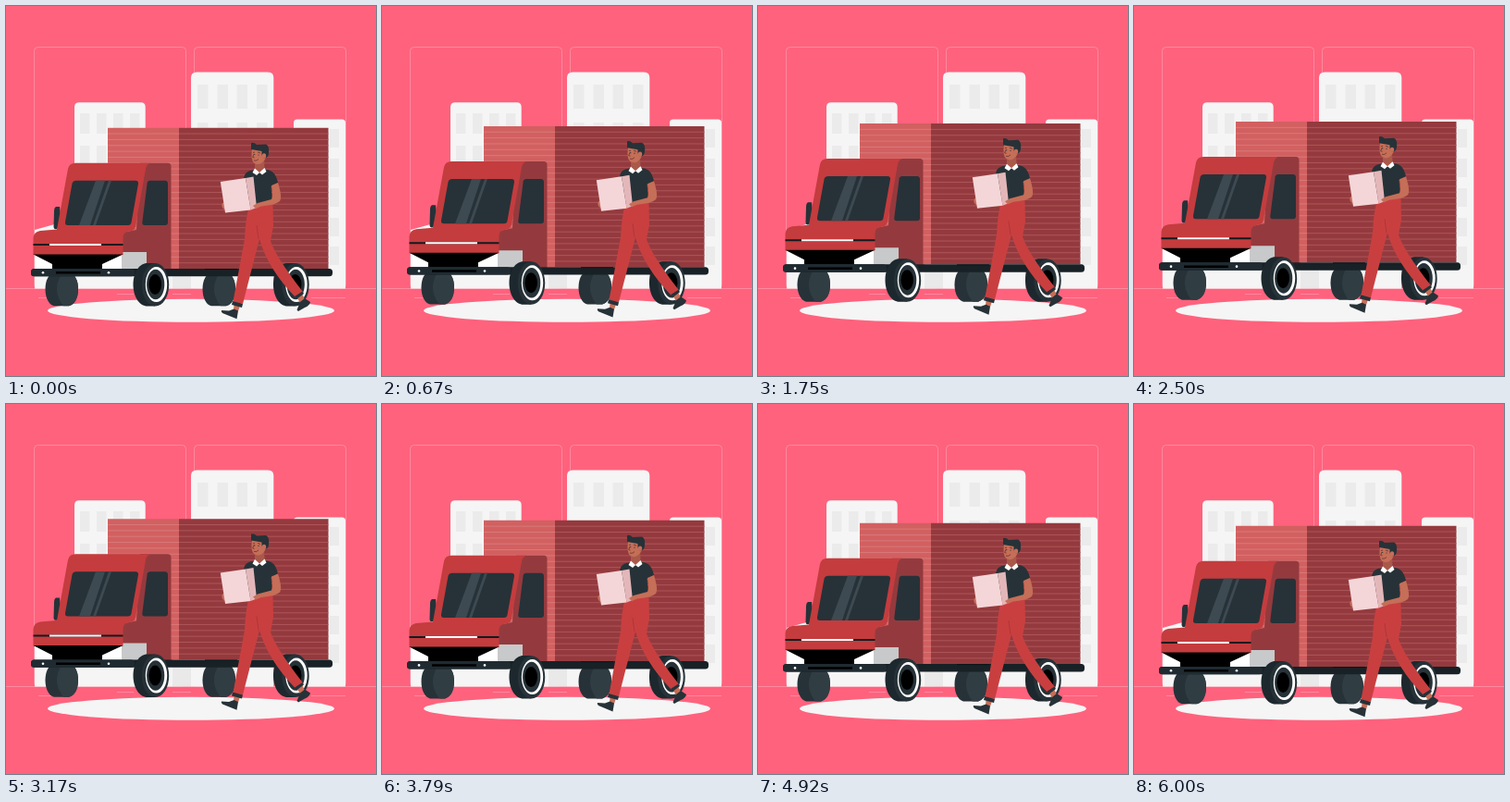
Recreate the animation shown at these times as an HTML page. Size 400x400 px, loop 6040 ms.

```html
<!DOCTYPE html>
<html lang="en">
<head>
<meta charset="utf-8">
<title>Delivery</title>
<style>
html, body { margin: 0; width: 100%; height: 100%; overflow: hidden; background: #ff627d; }
svg { display: block; width: 100vw; height: 100vh; }
</style>
</head>
<body>
<svg viewBox="0 0 400 400">
  <defs>
    <g id="wheel">
      <path d="M153 278H161V324.500H153C144 324.500 137.500 314 137.500 301S144 278 153 278Z" fill="#1c282d"/>
      <ellipse cx="161.500" cy="301.300" rx="14.700" ry="23.200" fill="#263238"/>
      <ellipse cx="162.500" cy="301" rx="11.700" ry="19" fill="#fff"/>
      <ellipse cx="161.700" cy="301" rx="9.600" ry="16.300" fill="#263238"/>
      <ellipse cx="161.200" cy="301" rx="6.800" ry="11" fill="#000"/>
    </g>
    <g id="inner">
      <path d="M53 288H68C74 289 78 296 78 306S74 323 68 324.300H52C46 323 42.500 315 42.500 306S46 289 53 288Z" fill="#263238"/>
      <path d="M62 288H68C74 289 78 296 78 306S74 323 68 324.300H62C57 318 55 312 55 306S57 293 62 288Z" fill="#303d43"/>
    </g>
  </defs>

  <g fill="none" stroke="#ff9bac" stroke-width=".7">
    <rect x="30.500" y="44.500" width="164" height="261" rx="4"/>
    <rect x="203.500" y="44.500" width="164" height="261" rx="4"/>
    <path d="M0 305.500H400M35 315.500H55M120 311.500H138M330 315.500H367M180 311.500H200"/>
  </g>
  <g fill="#f5f5f5">
    <path d="M31 305.500V242L56 235H74V109.300Q74 104.300 79 104.300H145.700Q150.700 104.300 150.700 109.300V280H180V305.500Z"/>
    <path d="M180 200H200V305.500H180Z" fill="#e9e9e9"/>
    <path d="M200 305.500V77.500Q200 71.500 206 71.500H283.300Q289.300 71.500 289.300 77.500V305.500Z"/>
    <path d="M311 305.500V126Q311 122.500 315 122.500H363Q367 122.500 367 126V305.500Z"/>
  </g>
  <g id="panes" fill="#ebebeb"></g>
  <ellipse cx="200" cy="329.300" rx="155" ry="12.500" fill="#f5f5f5"/>

  <g id="float">
    <use href="#inner"/>
    <use href="#inner" x="170"/>

    <path d="M110 131.700H187V284H110Z" fill="#d26061"/>
    <path d="M187 131.700H348.500V284H187Z" fill="#943a3e"/>
    <g id="ribs" fill="none"></g>

    <path d="M125 264H152V284.500H125Z" fill="#c7c9ca"/>
    <path d="M31 267H125V284.500H31Z" fill="#fff"/>
    <path d="M58 217L54 217Q52 218 52 222L51.500 239Q52 242 55 241L60 236Z" fill="#263238"/>
    <path d="M145 169.700H175Q178.500 170 178.500 173V284.500H152V266H126V245L141 242Z" fill="#943a3e"/>
    <path d="M75 169.700H156Q152 171 151 176L140 238Q139 243 133 243.500Q126.500 244 126.500 251V269H29.500V251Q30 244 37 243L55 241.500L67 176Q68.500 169.700 75 169.700Z" fill="#c43c3e"/>
    <path d="M76 188.700H140Q143.500 189 143 192L135.500 234Q135 237 132 237H67Q63.500 237 64 233.500L71.500 192Q72 189 76 188.700Z" fill="#263238"/>
    <path d="M97 188.700H107L91 237H79ZM111 188.700H114L97 237H94Z" fill="#3d4a51"/>
    <path d="M155.500 188.700H172Q175 189 175 192V234Q175 237 172 237H150Q147 237 147.300 234L152.700 191Q153 189 155.500 188.700Z" fill="#263238"/>
    <path d="M29.500 258H126.500" stroke="#111b20" stroke-width="2"/>
    <path d="M47 258H103" stroke="#fff" stroke-width="2"/>
    <path d="M29.500 268.500H126.500L104 279V284.500H50V279Z" fill="#000"/>

    <rect x="27" y="284" width="326" height="8.300" rx="3.500" fill="#172126"/>
    <rect x="27" y="284" width="112" height="8.300" rx="3.500" fill="#1f2b31"/>
    <path d="M54 288.300H102" stroke="#000" stroke-width="2.500"/>
    <path d="M215 284.500H250" stroke="#0c1418" stroke-width="1"/>
    <circle cx="40" cy="288.300" r="1.300" fill="#fff"/>
    <circle cx="111" cy="288.300" r="1.300" fill="#fff"/>
    <use href="#wheel"/>
    <use href="#wheel" x="151.500"/>

    <g id="man">
      <path d="M313 312L318 321L323 317L319 309ZM247 317L246 329L251 330L255 318Z" fill="#c56e58"/>
      <path d="M233 329L241 329.500L246.500 327.500L251 329.500L249.500 338.300L234 332Q232 330 233 329Z" fill="#263238"/>
      <path d="M314.500 328.500L318 320L323 316L329 320Q328 324 323 326L316 330Z" fill="#263238"/>
      <path d="M270 215L288.500 214L289 238L286 254Q292 272 321 309L313 315Q283 284 274 252L256 322L245.500 319.500L258 252Q259 229 263 216Z" fill="#c93f40"/>
      <path d="M273 252L271 237" stroke="#a93438" fill="none" stroke-width=".8"/>
      <path d="M245 319L256 322L255 326L244 323ZM312 314L320.500 308.500L322 311L314 317Z" fill="#263238"/>
      <path d="M257 186Q258 178 267 177.500L281 177Q291 177 294 191L286.500 195L288 213L270 217L264 214Z" fill="#263238"/>
      <path d="M269 166L279 164L279.500 176L274 181L269 177Z" fill="#a9594a"/>
      <path d="M269 175.500L274 180L279.500 175L281.500 179L277 182.500L274 180L271 183L266.500 180Z" fill="#fff"/>
      <path d="M266 154Q271 150 280 154L281 164Q277 172 271 171Q265 170 265.500 160Z" fill="#c56e58"/>
      <path d="M265 155V148Q268 147 271 150L281 149.500Q285 151 284 159Q284 164 279 164.500Q276 163 276.500 157Q271 156 265 155Z" fill="#263238"/>
      <ellipse cx="279" cy="162" rx="2.200" ry="2.700" fill="#c56e58"/>
      <path d="M267 158.500L269 158M272 158L275 159M268 160L266.700 163.500L268.500 164M268 167Q271 168 273 165.500" fill="none" stroke="#532d27" stroke-width=".7"/>
      <circle cx="268.700" cy="160.500" r=".6" fill="#263238"/>
      <circle cx="273" cy="161" r=".6" fill="#263238"/>
      <path d="M239 211L234 213Q232 217 236 220L240 219Z" fill="#c56e58"/>
      <path d="M231.800 190L259 186L264.500 220.500L237 223.500Z" fill="#f4d6d8"/>
      <path d="M259 186L267.500 184.500L271 218L264.500 220.500Z" fill="#e3b7b9"/>
      <path d="M287 194L294 191Q299 207 296 211Q292 215 276 216.500L270 219L267 216L272 213L287 209Q289 206 287 194Z" fill="#c56e58"/>
    </g>
  </g>
</svg>
<script>
const byId = id => document.getElementById(id);
const panes = (xs, ys, w, h) => {
  for (const x of xs) for (const y of ys)
    byId('panes').innerHTML += `<rect x="${x}" y="${y}" width="${w}" height="${h}"/>`;
};
panes([80, 98, 116, 134], [116, 151], 10.5, 22);
panes([207, 228.500, 249.500, 271], [85, 126], 11.5, 26);
panes([350], [133, 165, 197, 229, 260], 10, 20);

const GAP = 6.35;
for (let y = 131.7 + GAP; y < 282; y += GAP) {
  byId('ribs').innerHTML +=
    `<path d="M110 ${y}H187" stroke="#d97879"/><path d="M187 ${y}H348.500" stroke="#ad5559"/>`;
}

const LOOP = 6040, HALF = 3000, RISE = 8;

function draw(now) {
  const t = Math.min(now % LOOP, 2 * HALF);
  const lift = RISE * (1 - Math.abs(t / HALF - 1));
  byId('float').setAttribute('transform', `translate(0 ${-lift})`);
  requestAnimationFrame(draw);
}
draw(0);
</script>
</body>
</html>
```
